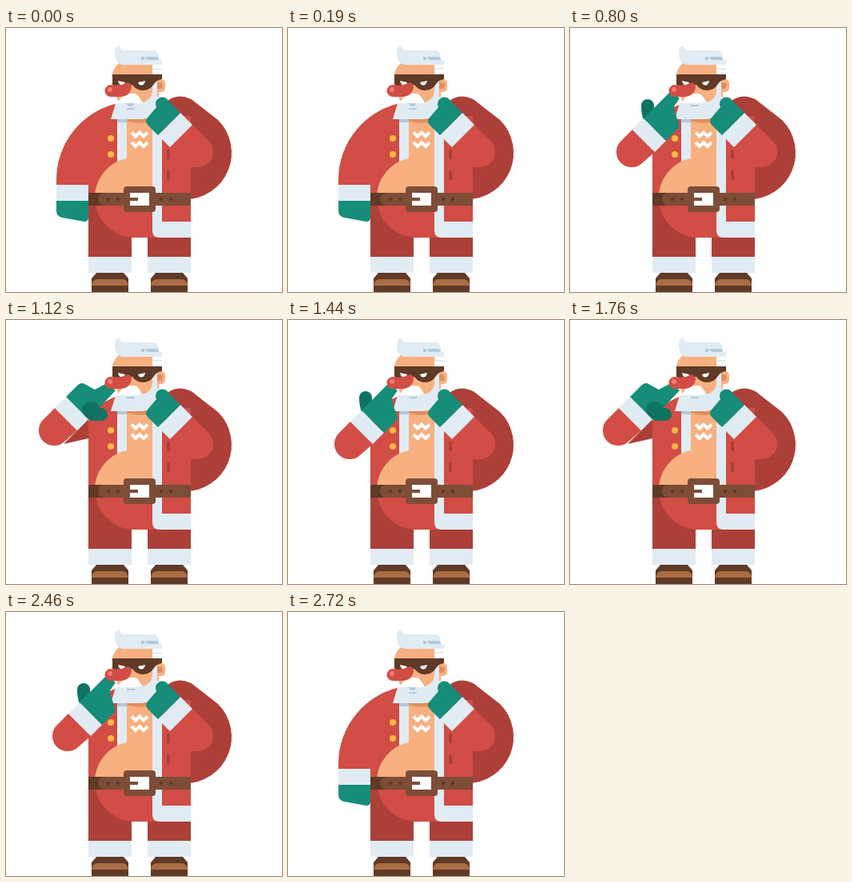
Recreate the animation shown at these times as an HTML page. Size 345 px wide and 330 px high, loop 2800 ms.

```html
<!DOCTYPE html>
<html lang="en">
<head>
<meta charset="utf-8">
<title>Santa in a mask</title>
<style>
  html, body { margin: 0; width: 100%; height: 100%; overflow: hidden; background: #fff; }
  svg { display: block; width: 345px; height: 330px; }
  .red { fill: #d14d45; }
  .wine { fill: #ac4039; }
  .skin { fill: #f8b080; }
  .tan { fill: #e18e5c; }
  .fur { fill: #e1ebf3; }
  .shade { fill: #b0cbdb; }
  .green { fill: #168d78; }
  .pine { fill: #0f7362; }
  .belt { fill: #7d4d38; }
  .dark { fill: #5f3a27; }
  .gold { fill: #ffb843; }
  .white { fill: #fff; }

  .rest, .touch, .tap { animation: 2.8s step-end infinite; visibility: hidden; }
  .rest { animation-name: rest; }
  .touch { animation-name: touch; }
  .tap { animation-name: tap; }
  @keyframes rest {
    0%, 97.1428% { visibility: visible; }
    11.4285%, 100% { visibility: hidden; }
  }
  @keyframes touch {
    0%, 40%, 62.8571%, 97.1428%, 100% { visibility: hidden; }
    11.4285%, 51.4285%, 74.2857% { visibility: visible; }
  }
  @keyframes tap {
    0%, 51.4285%, 74.2857%, 100% { visibility: hidden; }
    40%, 62.8571% { visibility: visible; }
  }
</style>
</head>
<body>
<svg viewBox="0 0 345 330">
  <defs>
    <g id="leg">
      <path class="wine" d="M103 222h54v64h-54z"/>
      <path class="fur" d="M103 286h54v20h-54z"/>
      <path class="dark" d="M113 306h34l6 7v17h-46v-17z"/>
      <path fill="#a96c43" d="M107 322q1-8 8-8h30q7 0 8 8z"/>
    </g>
    <g id="sleeve">
      <path class="red" d="M78 127L62.6 142.6A19 19 0 0 0 89.4 169.4L106 155z"/>
      <path class="fur" d="M92 113l28 28-14 14-28-28z"/>
    </g>
  </defs>

  <!-- sack -->
  <path class="wine" d="M190 114A28 28 0 0 1 238 94L265 115A58 58 0 0 1 224 214z"/>

  <!-- legs -->
  <use href="#leg"/>
  <use href="#leg" x="74"/>
  <path class="wine" d="M150 222h81v40h-81z"/>

  <!-- coat -->
  <path class="red" d="M103 206V126Q112 103 145 93L195 110H231V242H183V206z"/>
  <path class="red rest" d="M63 196V190A98 98 0 0 1 145 93V206H103V196z"/>
  <path class="skin" d="M151 108h32v98h-32z"/>
  <path class="tan" d="M151 112h34v3q-17 7-34 1z"/>
  <path class="fur" d="M139 108h12v70h-12z"/>
  <path class="shade" d="M139 113h12v5h-12z"/>
  <path class="skin" d="M111 212A50 50 0 0 1 161 162H183V212z"/>
  <path class="red" d="M111 212A50 50 0 0 0 161 262H195V212z"/>
  <path class="fur" d="M183 96h12V242h36v20H192q-9 0-9-9z"/>
  <g class="gold"><circle cx="131" cy="138" r="4"/><circle cx="131" cy="158" r="4"/></g>
  <path d="M157 130.500l5 5 5-5 5 5 5-5M157 143l5 5 5-5 5 5 5-5" fill="none" stroke="#fff" stroke-width="4"/>

  <!-- belt -->
  <path class="dark" d="M103 206h20v16h-20z"/>
  <path class="belt" d="M123 206H231v16H123a8 8 0 0 1 0-16z"/>
  <g class="dark">
    <circle cx="128" cy="214" r="2.300"/><circle cx="140" cy="214" r="2.300"/>
    <circle cx="194" cy="214" r="2.300"/><circle cx="206" cy="214" r="2.300"/>
  </g>
  <rect class="belt" x="147" y="198" width="40" height="32" rx="4"/>
  <path class="white" d="M155 206h24v16h-24z"/>
  <path class="belt" d="M155 212h10v4h-10z"/>

  <!-- head -->
  <path class="skin" d="M133 60Q133 51 141 44H191V97H141z"/>
  <rect class="skin" x="185" y="64" width="14" height="16" rx="5"/>
  <path class="tan" d="M189 68h3a4 4 0 0 1 0 8h-3z"/>
  <path class="fur" d="M183 40h12v18h-12z"/>
  <path class="white" d="M183 46h12v4h-12zM183 52h12v4h-12z"/>
  <path class="fur" d="M145 46Q136 43 136 33V29Q136 24 141 22Q143 28 148 28H183Q191 28 191 37V46z"/>
  <path class="shade" d="M169 36h4v4h-4zM174 36h13q4 0 4 4H179q-4 0-5-4z"/>
  <path class="fur" d="M137 94H166Q181 92 183 80V66H189V86H193V95Q186 114 168 114H131z"/>
  <path class="white" d="M136 94Q143 92 146 82H162Q166 84 171 94z"/>
  <g class="rest shade"><path d="M151 94h9a4.500 4 0 0 1-9 0zM151 100h10v2h-10z"/></g>
  <path class="fur touch" d="M158 94Q168 94 170 91L174 96H158z"/>
  <path class="fur tap" d="M158 94Q168 94 170 91L174 96H158z"/>
  <path class="shade touch" d="M151 96h10v2h-10z"/>
  <path class="shade tap" d="M151 96h10v2h-10z"/>
  <path class="dark" d="M133 58H195V64Q188 65 185 70Q180 78 171 78Q163 78 158 71H150L143 75L133 71z"/>
  <path class="white" d="M140 66l9 2q-1 3.500-4 3.500-4 0-5-5.500zM174 66l-9 2q1 3.500 4 3.500 4 0 5-5.500z"/>

  <!-- raised arm on the sack -->
  <path class="red" d="M233 121L253.500 141.500A19 19 0 0 1 240 174H200V149z"/>
  <path class="wine" d="M201 152h4v12h-4zM201 178h4v12h-4z"/>
  <path class="fur" d="M218 106l15 15-28 28-15-15z"/>
  <path class="green" d="M203 91L218 106L190 134L177 121Q173 117 177 112L188 99A8 8 0 1 1 203 91z"/>

  <!-- moving arm -->
  <g class="rest">
    <path class="fur" d="M63 196h40v20H63z"/>
    <path class="green" d="M63 216H103V237Q103 242 98 242L70 237Q63 235 63 229z"/>
  </g>
  <g class="touch">
    <path class="pine" d="M89 97a8 8 0 0 1 16 0v14l-13 4q-3-8-3-18z"/>
    <use href="#sleeve"/>
    <path class="green" d="M92 113L126 79L137 88L130 98L132 108L136 119Q138 123 135 126L120 141z"/>
  </g>
  <g class="tap">
    <path class="wine" d="M72 155L89 138L103 124V148z"/>
    <use href="#sleeve" x="-17" y="-17"/>
    <path class="green" d="M75 96L90 81Q95 77 100 81L111 87L126 79L137 88L122 104L103 124z"/>
    <path class="pine" d="M106 102Q115 102 117 110H119a8 8 0 0 1 0 16H110Q104 126 101 122L97 118Q93 112 97 106Q100 102 106 102z"/>
  </g>

  <!-- nose -->
  <path class="red" d="M131 71Q143 73 152 68Q157 69 157 74Q155 86 142 86H131A7.500 7.500 0 0 1 131 71z"/>
  <circle cx="130" cy="77" r="3" fill="#f47b78"/>
</svg>
</body>
</html>
```
